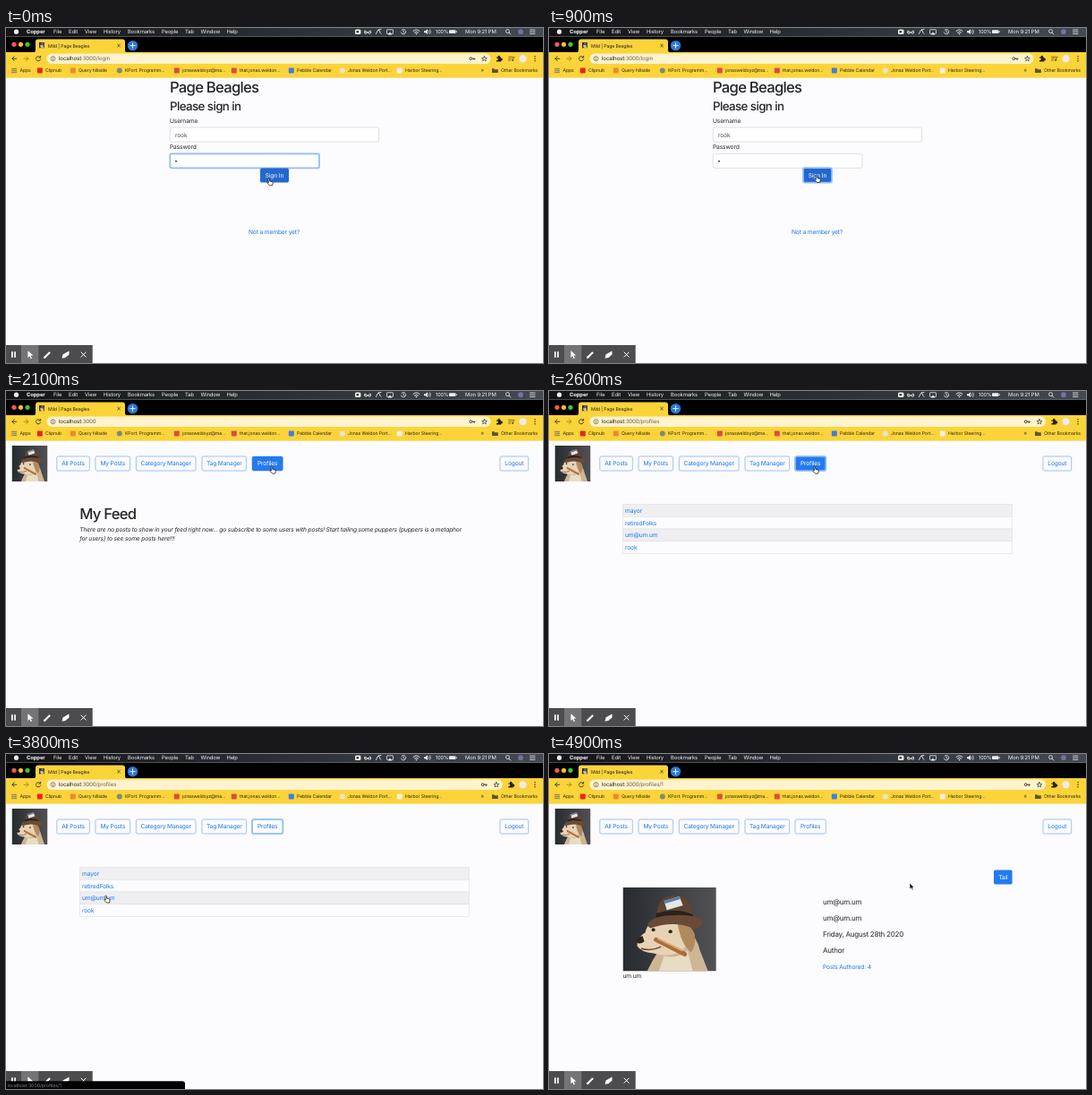
Animation of 600 by 374 pixels, one loop 5 s. Source, as an HTML page:

```html
<!DOCTYPE html>
<html lang="en">
<head>
<meta charset="utf-8">
<title>Sign-in walkthrough</title>
<style>
html, body { margin: 0; width: 100%; height: 100%; overflow: hidden; background: #fcfbfd; }
svg { display: block; width: 100%; height: 100%; }
text { font-family: Inter, "Liberation Sans", sans-serif; letter-spacing: -.022em; white-space: pre; text-rendering: geometricPrecision; }
</style>
</head>
<body>
<svg id="stage" viewBox="0 0 600 374"></svg>
<script>
const LOOP = 5000, BLUE = '#1877f2', INK = '#212529', YELLOW = '#fbd43a';

// Markup helpers
const text = (x, y, s, size = 6.67, fill = INK, extra = '') =>
  `<text x="${x}" y="${y}" font-size="${size}" fill="${fill}" ${extra}>${s}</text>`;
const rect = (x, y, w, h, fill, r = 0, extra = '') =>
  `<rect x="${x}" y="${y}" width="${w}" height="${h}" rx="${r}" fill="${fill}" ${extra}/>`;
const dot = (x, y, r, fill, extra = '') => `<circle cx="${x}" cy="${y}" r="${r}" fill="${fill}" ${extra}/>`;
const line = (d, color = '#333', w = .9) =>
  `<path d="${d}" fill="none" stroke="${color}" stroke-width="${w}" stroke-linecap="round" stroke-linejoin="round"/>`;
const shape = (d, fill) => `<path d="${d}" fill="${fill}"/>`;
const group = (id, body) => `<g id="${id}">${body}</g>`;
const gradient = (id, from, to) =>
  `<linearGradient id="${id}"><stop stop-color="${from}"/><stop offset="1" stop-color="${to}"/></linearGradient>`;
const heading = (x, y, s, size) => text(x, y, s, size, INK, 'font-weight="500" style="letter-spacing:-.045em"');
const centered = (x, y, s, fill) => text(x, y, s, 6.67, fill, 'text-anchor="middle"');
const ring = (x, y, w, h) => rect(x, y, w, h, 'none', 2, 'stroke="#8fbdf8" stroke-width="1.7"');
const button = (x, w, s, y = 73) =>
  rect(x, y, w, 16, '#fcfbfd', 1.7, 'stroke="#5a9ff5" stroke-width=".6"') + centered(x + w / 2, y + 10.4, s, BLUE);
const solid = (x, y, w, s, fill = '#247af0') => rect(x, y, w, 16, fill, 1.7) + centered(x + w / 2, y + 10.4, s, '#fff');
const input = (x, y, w) => rect(x, y, w, 16, '#fff', 1.7, 'stroke="#ced4da" stroke-width=".7"');

function menuBar() {
  const items = [[53, 'File'], [70, 'Edit'], [88, 'View'], [109, 'History'], [136, 'Bookmarks'],
    [174, 'People'], [200, 'Tab'], [217.5, 'Window'], [246.5, 'Help']];
  return rect(0, 0, 600, 9.5, 'url(#menuShade)') + dot(11.5, 4.2, 2.6, '#eee')
    + text(23, 6.2, 'Copper', 5.9, '#fff', 'font-weight="700"')
    + items.map(([x, s]) => text(x, 6.2, s, 5.9, '#f4f4f4')).join('')
    + rect(390, 1.5, 6.5, 5.5, '#eee', 1.6) + rect(391.5, 3.2, 2.6, 2, '#222', .4)
    + line('M401 3 400.8 5M407 3 407.5 5M403.3 5H405', '#eee')
    + dot(402, 5, 1.3, 'none', 'stroke="#eee" stroke-width=".8"') + dot(406.3, 5, 1.3, 'none', 'stroke="#eee" stroke-width=".8"')
    + line('M413.5 6.5Q416 0 417 3T419 6.5M416 2 419 1.5', '#eee')
    + rect(425.5, 1.8, 7, 4.6, 'none', .5, 'stroke="#eee" stroke-width=".8"') + shape('M426.8 7.5 429 4.4 431.2 7.5Z', '#eee')
    + line('M442 2.4A2.7 2.7 0 1 1 441.4 5M444 3V4.5L445.3 5.2', '#eee', .8)
    + line('M455 3.4Q458.5 .2 462 3.4M456.5 5Q458.5 3.3 460.5 5', '#eee', 1) + dot(458.5, 6.6, .8, '#eee')
    + shape('M467 3.2H468.7L471 1.3V7.1L468.7 5.2H467Z', '#eee') + line('M472.2 2.8Q473.4 4.2 472.2 5.6M473.7 1.8Q475.7 4.2 473.7 6.6', '#eee', .7)
    + text(480, 6.2, '100%', 5.6, '#f4f4f4')
    + rect(495, 2.3, 7.5, 3.8, '#eee', .8) + rect(503, 3.4, .8, 1.6, '#eee')
    + text(513, 6.2, 'Mon 9:21 PM', 5.9, '#f4f4f4')
    + dot(560.5, 3.6, 2, 'none', 'stroke="#eee" stroke-width=".8"') + line('M562 5.1 563.8 7', '#eee')
    + dot(575, 4.2, 2.9, '#7770a0') + line('M585.5 2H591M585.5 4.2H591M585.5 6.4H591', '#eee', .8);
}

function browser() {
  const bookmarks = [
    [44, 'Clipnub', '#e5281f'], [81, 'Query hillside', '#ee8a2c'], [133, 'KPort: Programm...', '#7d8a78', 1],
    [197, 'jonasweldxyz@ma...', '#d9503c'], [261, 'that.jonas.weldon...', '#d9503c'],
    [325, 'Pebble Calendar', '#3f7fdc'], [382, 'Jonas Weldon Port...', '#e9e3cf', 1], [446, 'Harbor Steering...', '#f3efe2']];
  return rect(0, 9.5, 600, 18, '#000')
    + [[9, '#f4584f'], [16.5, '#f8bd32'], [24, '#37c748']].map(([x, c]) => dot(x, 18.3, 2.6, c)).join('')
    + shape('M30 27.5Q33 27.5 33 24.5V15.5Q33 12.5 36 12.5H130Q133 12.5 133 15.5V24.5Q133 27.5 136 27.5Z', YELLOW)
    + '<use href="#photo" x="37" y="16" width="6" height="6.6"/>'
    + text(47, 21.6, 'Mild | Page Beagles', 5.2, '#222')
    + line('M124.6 18.2 127.4 21M127.4 18.2 124.6 21', '#333', .8)
    + dot(141.5, 19.6, 5.7, '#2d78d8') + line('M138.7 19.6H144.3M141.5 16.8V22.4', '#fff', .9)
    + rect(0, 27, 600, 28.6, YELLOW)
    + line('M11.8 34.2H6.8L9.2 31.8M6.8 34.2 9.2 36.6', '#333')
    + line('M20 34.2H25L22.6 31.8M25 34.2 22.6 36.6', '#9a8429')
    + line('M38.3 32.8A2.6 2.6 0 1 0 38.6 35M38.6 31.3V33H36.9', '#333')
    + rect(45.5, 28.4, 496, 11.6, '#fff3cd', 5.8, 'id="addressBox"')
    + dot(52.5, 34.2, 2.5, 'none', 'stroke="#555" stroke-width=".7"') + line('M52.5 34V35.5M52.5 32.8V32.9', '#555', .7)
    + text(59, 36.3, 'localhost<tspan id="path" fill="#6b6656"></tspan>', 6.15, '#222')
    + group('tools', dot(519.3, 34.2, 1.4, 'none', 'stroke="#333" stroke-width=".9"') + line('M520.7 34.2H524M523 34.2V35.5')
      + line('M534.5 31.4 535.3 33.4 537.4 33.5 535.8 34.8 536.3 36.8 534.5 35.7 532.7 36.8 533.2 34.8 531.6 33.5 533.7 33.4Z', '#333', .7)
      + shape('M548 32.4H549.6A1.2 1.2 0 1 1 551.9 32.4H553.2V34A1.2 1.2 0 1 1 553.2 36.2V37.5H548V35.7A1.2 1.2 0 1 0 548 33.8Z', '#222'))
    + group('queue', line('M561.5 32.2H566M561.5 34.2H565M561.5 36.2H563.5', '#6b5b20', .8) + line('M566.8 36V32.5H568', '#6b5b20') + dot(566, 36, 1, '#6b5b20'))
    + dot(577.5, 34.2, 4.5, '#f5ead8', 'stroke="#d6bc8d" stroke-width=".4"')
    + [31.7, 34.2, 36.7].map(y => dot(591, y, .75, '#333')).join('')
    + [0, 1, 2, 3, 4, 5, 6, 7, 8].map(i => rect(6.3 + i % 3 * 2, 44.8 + (i / 3 | 0) * 2, 1.4, 1.4, ['#d24b3c', '#4c8050', '#476fae'][i % 3])).join('')
    + text(15.5, 49.4, 'Apps', 5.2, '#2c2713')
    + bookmarks.map(([x, s, c, round]) => rect(x - 9.2, 44.6, 6, 5.8, c, round ? 3 : .8) + text(x, 49.4, s, 5.2, '#2c2713')).join('')
    + text(530.5, 49.4, '»', 6, '#333') + shape('M543 45.2H545.3L546.2 46.2H549.8V50H543Z', '#5b5331')
    + text(553, 49.4, 'Other Bookmarks', 5.2, '#2c2713');
}

const login = () => heading(183, 71.8, 'Page Beagles', 16.67) + heading(183, 91.6, 'Please sign in', 13.33)
  + text(183, 105.5, 'Username') + input(183.3, 111, 233.2) + text(189, 121.6, 'rook', 6.67, '#495057')
  + text(183, 134.9, 'Password') + input(183.3, 140.3, 166.7) + dot(190, 148.8, .95, '#333')
  + group('fieldFocus', ring(183.3, 140.3, 166.7, 16))
  + solid(284, 156.4, 32, 'Sign In', '#2368cf') + group('signFocus', ring(284, 156.2, 32, 16.4))
  + text(271, 229.6, 'Not a member yet?', 6.67, BLUE);

const nav = () => '<use href="#photo" x="6.5" y="61" width="40" height="40"/>'
  + button(56.8, 36.5, 'All Posts') + button(100, 38.6, 'My Posts') + button(145.4, 66.6, 'Category Manager')
  + button(219, 49.6, 'Tag Manager') + button(275, 34.3, 'Profiles') + button(552, 31.7, 'Logout')
  + group('profilesHover', solid(275, 73, 34.3, 'Profiles')) + group('profilesFocus', ring(275, 73, 34.3, 16));

const feed = () => heading(82.2, 142.6, 'My Feed', 16.67)
  + text(82.3, 157.2, 'There are no posts to show in your feed right now... go subscribe to some users with posts! Start tailing some puppers (puppers is a metaphor', 6.67, INK, 'font-style="italic"')
  + text(82.3, 167.2, 'for users) to see some posts here!!!', 6.67, INK, 'font-style="italic"');

const table = () => ['mayor', 'retiredFolks', 'um@um.um', 'rook'].map((name, i) => {
  const y = 126.5 + i * 13.75;
  return rect(82.5, y, 435, 13.75, i % 2 ? '#fcfbfd' : '#efeef0', 0, `${i ? '' : 'id="firstRow"'} stroke="#dee0e4" stroke-width=".6"`)
    + text(85, y + 9.4, name, 6.67, BLUE);
}).join('');

const profile = () => solid(497, 129.5, 20.6, 'Tail')
  + '<use href="#photo" x="82.5" y="149" width="104.3" height="93.5"/>' + text(82.5, 249.7, 'um um')
  + ['um@um.um', 'um@um.um', 'Friday, August 28th 2020', 'Author'].map((s, i) =>
    text(306, 167.6 + i * 18.2, s, 8, INK, 'style="letter-spacing:-.03em"')).join('')
  + text(306, 239.6, 'Posts Authored: 4', 6.67, BLUE);

const photo = () => '<symbol id="photo" viewBox="0 0 104 93" preserveAspectRatio="none">'
  + rect(0, 0, 104, 93, 'url(#backdrop)')
  + shape('M27 93Q33 80 40 70L70 46Q83 55 86 70L95 93Z', '#cdb694')
  + shape('M46 76Q60 80 72 70L78 93H40Z', '#e9dcc4')
  + shape('M34 36Q27 41 25 50Q15 56 16 65Q20 72 34 73Q58 80 70 66L74 38Z', '#e6d3b6')
  + shape('M61 40Q75 38 80 52Q82 64 76 72Q65 64 61 40Z', '#b08a5e')
  + shape('M22 54Q15 55 15 61Q19 64 24 60Z', '#2f2520')
  + dot(34, 47, 2, '#33251f') + dot(53, 49, 2.1, '#33251f')
  + line('M21 68Q32 71 42 66', '#6a4c38', 1.6)
  + line('M37 58 69 74', '#b06a39', 5) + line('M39 57 66 70', '#dba672', 1.8)
  + shape('M38 34Q37 15 49 10Q63 6 73 15Q78 22 79 37Z', '#5d4433')
  + shape('M37 29Q58 22 78 30V37Q58 29 37 36Z', '#2b201b')
  + shape('M28 40Q33 32 52 31Q76 29 89 36Q89 44 80 46Q58 36 31 45Q27 44 28 40Z', '#6a4a37')
  + shape('M46 15 63 10 67 20 49 25Z', '#e5e6e5') + shape('M46 15 63 10 64 13 47 18Z', '#557fae')
  + '</symbol>';

const recorder = () => rect(0, 354, 96.7, 20, '#4c4c4e') + rect(17, 354, 19.3, 20, '#747476')
  + rect(6, 361.3, 1.7, 6.5, '#fff') + rect(9.2, 361.3, 1.7, 6.5, '#fff')
  + shape('M24.4 360.2 30.3 365.5 27.6 365.8 29 368.7 27.7 369.3 26.3 366.3 24.4 368.2Z', '#fff')
  + line('M43.5 367.5 48.5 362.5', '#fff', 2.1) + shape('M42 369 42.5 366.5 44.5 368.5Z', '#fff')
  + shape('M62.5 368.8 63.5 364.5 70.5 360.5V364.5L66.5 368Z', '#fff')
  + line('M84 362 89.2 367.2M89.2 362 84 367.2', '#fff', 1);

const status = () => shape('M0 365.3H197Q200 365.3 200 368.3V374H0Z', '#000')
  + text(1.5, 371.8, 'localhost:3000/profiles/1', 5.4, '#85858a');

const cursor = () => group('cursor',
  group('arrow', '<path d="M0 0V7L1.7 5.5 2.9 8 4.1 7.4 3 5H5Z" fill="#111" stroke="#fff" stroke-width=".6"/>')
  + group('hand', '<path d="M.2.6Q1 -.4 1.7.6L2.1 3.2 5 4Q5.8 4.5 5.4 6L4.8 8H1.8L-.9 5.1Q-.7 4.1.7 4.8Z" fill="#fff" stroke="#111" stroke-width=".75"/>'));

document.getElementById('stage').innerHTML =
  `<defs>${gradient('menuShade', '#121417', '#444952')}${gradient('backdrop', '#272c30', '#515155')}${photo()}</defs>`
  + rect(0, 0, 600, 374, '#fcfbfd') + browser() + menuBar()
  + group('login', login()) + group('nav', nav()) + group('feed', feed()) + group('table', table())
  + group('profile', profile()) + recorder() + group('status', status()) + cursor();

const el = id => document.getElementById(id);
const show = (id, on) => { el(id).style.display = on ? '' : 'none'; };

// Pointer tip: time, x, y
const TRACK = [[0, 292.7, 167.8], [100, 292.7, 167.8], [500, 297.6, 164.4], [1500, 298, 164.3], [2100, 295.8, 84.2],
  [2600, 295.8, 84.2], [2700, 114.3, 145], [2950, 114.3, 145], [3200, 109, 133], [3500, 114.3, 145],
  [3800, 110.6, 158], [4100, 110.6, 158], [4800, 403, 144], [LOOP, 403, 144]];

function pointerAt(t) {
  const i = TRACK.findIndex(k => k[0] > t), [t0, x0, y0] = TRACK[i - 1], [t1, x1, y1] = TRACK[i];
  const p = (t - t0) / (t1 - t0), e = p * p * (3 - 2 * p);
  return [x0 + (x1 - x0) * e, y0 + (y1 - y0) * e];
}

function render(now) {
  const t = Math.floor(now % LOOP / 100) * 100;
  const within = (a, b) => t >= a && t < b;
  show('login', t < 1000);
  show('nav', t >= 1000);
  show('feed', within(1000, 2300));
  show('table', within(2300, 3900));
  show('profile', t >= 3900);
  show('fieldFocus', t < 600);
  show('signFocus', t >= 600);
  show('profilesHover', within(2000, 2700));
  show('profilesFocus', within(2200, 3900));
  show('status', within(3800, 4300));
  show('queue', t < 2300);
  const toolShift = t < 2300 ? 0 : 13.4;
  el('tools').setAttribute('transform', `translate(${toolShift} 0)`);
  el('addressBox').setAttribute('width', 496 + toolShift);
  el('firstRow').setAttribute('fill', within(3100, 3700) ? '#e7e6e8' : '#efeef0');
  el('path').textContent = ':3000' + (t < 1000 ? '/login' : t < 2300 ? '' : t < 3900 ? '/profiles' : '/profiles/1');
  const hand = t < 1000 || within(2000, 3900);
  show('hand', hand);
  show('arrow', !hand);
  el('cursor').setAttribute('transform', `translate(${pointerAt(t)})`);
  requestAnimationFrame(tick);
}
const start = performance.now();
const tick = () => render(performance.now() - start);
tick();
</script>
</body>
</html>
```
